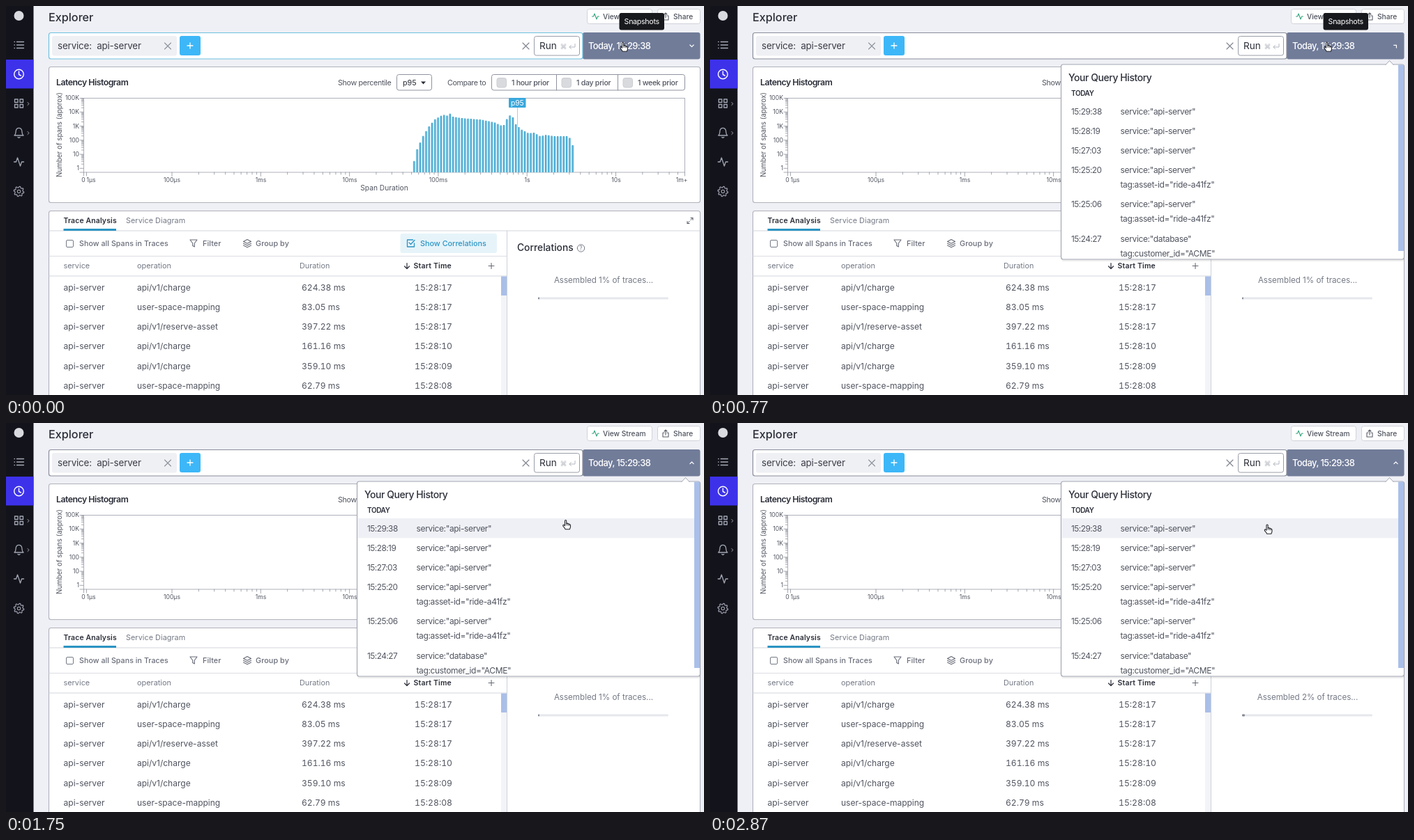
An HTML page that plays this animation: 1001x559 px, repeating every 3.01 s.

```html
<!DOCTYPE html>
<html lang="en">
<head>
<meta charset="utf-8">
<title>Explorer</title>
<style>
html, body { margin: 0; width: 100%; height: 100%; overflow: hidden; background: #eff0f5; }
svg { display: block; width: 100vw; height: 100vh; }
text { font-family: Inter, "Open Sans", "DejaVu Sans", sans-serif; white-space: pre; }
.tabular { font-variant-numeric: tabular-nums; }
</style>
</head>
<body>
<svg id="stage" viewBox="0 0 1001 559"></svg>
<script>
const LOOP = 3010, STEP = 70;
const INK = '#2b2e38', TEXT = '#50545f', MUTED = '#747985', LINE = '#b0b2bb', BLUE = '#2b94c4';

// Text placed by the middle of its capitals.
function label(x, y, str, size, { fill = TEXT, weight = 400, gap = 0, anchor = 'start', extra = '' } = {}) {
  return `<text x="${x}" y="${(y + size * 0.36).toFixed(2)}" font-size="${size}" fill="${fill}" font-weight="${weight}"
    letter-spacing="${gap}" text-anchor="${anchor}" ${extra}>${str}</text>`;
}
function box(x, y, w, h, fill, stroke = 'none', r = 0, extra = '') {
  return `<rect x="${x}" y="${y}" width="${w}" height="${h}" rx="${r}" fill="${fill}" stroke="${stroke}" ${extra}/>`;
}
function path(d, stroke, width = 1, extra = '') {
  return `<path d="${d}" fill="none" stroke="${stroke}" stroke-width="${width}" stroke-linecap="round" stroke-linejoin="round" ${extra}/>`;
}
function icon(x, y, d, stroke, width = 1.3) {
  return path(d, stroke, width, `transform="translate(${x} ${y})"`);
}
const ring = r => `M${-r} 0A${r} ${r} 0 1 1 ${r} 0A${r} ${r} 0 1 1 ${-r} 0`;
const cross = 'M-4.5 -4.5L4.5 4.5M4.5 -4.5L-4.5 4.5';
const plus = 'M-4 0H4M0 -4V4';
const pulse = 'M-7 0H-4L-2 -6L2 6L4 0H7';

function gear(teeth, inner, outer) {
  const points = Array.from({ length: teeth * 4 }, (_, i) => {
    const a = (i + 0.5) * Math.PI / (teeth * 2), r = i % 4 < 2 ? outer : inner;
    return `${(r * Math.cos(a)).toFixed(2)} ${(r * Math.sin(a)).toFixed(2)}`;
  });
  return `M${points.join('L')}Z`;
}

// Linear interpolation through points [position, ...values].
function through(points, p, column = 1) {
  let i = 1;
  while (i < points.length - 1 && points[i][0] < p) i++;
  const a = points[i - 1], b = points[i];
  const u = Math.min(1, Math.max(0, (p - a[0]) / (b[0] - a[0])));
  return a[column] + (b[column] - a[column]) * u;
}

function sidebar() {
  const c = '#a4a7b5';
  return box(0, 0, 39.5, 559, '#13141b') + box(0, 77, 39.5, 41.5, '#3d32ea')
    + '<circle cx="18.5" cy="14" r="7" fill="#d9dae0"/>'
    + icon(18.5, 56, 'M-6.5 -4.5H-6M-3 -4.5H7M-6.5 0H-6M-3 0H7M-6.5 4.5H-6M-3 4.5H7', c)
    + icon(18.5, 98, ring(6.8) + 'M0 -4V0.5L3 2', '#fff', 1.4)
    + icon(18.5, 140, 'M-6 -6H-1.5V-1.5H-6ZM1.5 -6H6V-1.5H1.5ZM-6 1.5H-1.5V6H-6ZM1.5 1.5H6V6H1.5Z', c)
    + icon(18.5, 182, 'M-6.5 4C-4 2 -4.5 -1 -4.3 -2.5C-3.6 -8 3.6 -8 4.3 -2.5C4.5 -1 4 2 6.5 4ZM-1.5 6.5Q0 8 1.5 6.5', c)
    + icon(18.5, 224, pulse, c)
    + icon(18.5, 266.5, ring(2.2) + gear(8, 5.6, 7.3), c, 1.1)
    + icon(32, 140.5, 'M-1 -2L1 0L-1 2', c, 1) + icon(32, 182.5, 'M-1 -2L1 0L-1 2', c, 1);
}

function topBar() {
  const button = { fill: '#4d515c', weight: 500 };
  return label(61, 16, 'Explorer', 16.2, { fill: INK, weight: 500 })
    + box(833.5, 4.5, 93, 21, '#fff', '#cfd2da', 3) + box(934.5, 4.5, 61, 21, '#fff', '#cfd2da', 3)
    + icon(845.5, 15, 'M-5 0H-3L-1.5 -4L1.5 4L3 0H5', '#39a582', 1.1)
    + label(856, 15, 'View Stream', 10.2, button)
    + icon(946, 15, 'M-2 -1H-4V5H4V-1H2M0 2V-5M-2 -3L0 -5L2 -3', '#5a5e69', 1.1)
    + label(957, 15, 'Share', 10.2, button)
    + box(827, 38, 168.5, 38.5, '#717c99', 'none', 3)
    + box(61.5, 38.5, 765.5, 37.5, '#fff', '#8a8e9b', 3, 'id="search" stroke-width="1.2"')
    + box(66, 43, 179, 28.5, '#eff0f4', 'none', 3)
    + label(74, 57.5, 'service:  api-server', 13.4, { fill: '#3a3d47', gap: -0.16 })
    + icon(232, 57.5, cross, '#8d919c', 1.1)
    + box(249, 43, 30, 28, '#3db7f8', 'none', 3) + icon(264, 57, plus, '#fff', 1.3)
    + icon(745.5, 57.5, cross, '#7d818c', 1.1)
    + box(757.5, 43.5, 65, 27.5, '#fff', '#999da8', 3)
    + label(765, 57.5, 'Run', 13.6, { fill: INK })
    + label(794.5, 58.5, '⌘', 10, { fill: '#b4b7c0' })
    + icon(812, 58, 'M4 -3.5V1H-4M-1.5 -1.5L-4 1L-1.5 3.5', '#b4b7c0', 1)
    + label(835, 57.5, 'Today, 15:29:38', 12.9, { fill: '#fff', weight: 500, gap: -0.55 })
    + '<g id="chevron">' + path('M-2.6 -1.3L0 1.3L2.6 -1.3', '#fff', 1.2) + '</g>';
}

function histogram() {
  const small = { fill: TEXT, gap: -0.28, weight: 500 };
  let s = box(61.5, 87.5, 934, 195, '#fff', LINE, 3, 'stroke-width="1.1"')
    + label(72, 110, 'Latency Histogram', 12.3, { fill: INK, weight: 600, gap: -0.5 })
    + label(476, 110, 'Show percentile', 10.7, { gap: -0.32 })
    + box(560.5, 98.5, 50, 22.5, '#fff', '#8f939f', 3)
    + label(569, 110, 'p95', 10.8, { fill: INK })
    + '<path d="M595 108.5h7l-3.500 4z" fill="#2b2e38"/>'
    + label(633, 110, 'Compare to', 10.7, { gap: -0.38 })
    + box(696.5, 98.5, 277, 22.5, '#fff', '#8f939f', 3)
    + path('M789.500 98.500V121M877.500 98.500V121', '#8f939f');
  [[704, '1 hour prior'], [797, '1 day prior'], [885, '1 week prior']].forEach(([x, name]) => {
    s += box(x, 103.5, 13.5, 13.5, '#d9dade', '#cccdd2', 3) + label(x + 21, 110, name, 10.6, small);
  });

  s += box(111.5, 132.5, 862, 106.5, '#fff', '#aeb1ba');
  let ticks = 'M111.500 239V244M973.500 239V244M115.500 239V244';
  for (let d = 0; d < 6; d++) {
    for (let m = 1; m < 10; m++) {
      const x = 238 + 127.3 * (d + Math.log10(m));
      if (x < 973) ticks += `M${x.toFixed(1)} 239V${m === 1 ? 244.5 : 242}`;
    }
  }
  for (let d = 0; d < 5; d++) {
    for (let m = 1; m < 10; m++) {
      ticks += `M111 ${(233.3 - 20.25 * (d + Math.log10(m))).toFixed(1)}H${m === 1 ? 106 : 108.5}`;
    }
  }
  s += path(ticks + 'M111 132.500H106M111 239H106', '#8f939d', 0.8);
  ['1', '10', '100', '1K', '10K', '100K'].forEach((name, i) => {
    s += label(105, 233.3 - 20.25 * i, name, 8.6, { anchor: 'end' });
  });
  [[111, '0'], [122, '1µs'], [238, '100µs'], [365.5, '1ms'], [493, '10ms'], [620, '100ms'], [747.5, '1s'], [875, '10s'], [969, '1m+']]
    .forEach(([x, name]) => { s += label(x, 250, name, 8.6, { anchor: 'middle' }); });
  s += label(542.5, 261.5, 'Span Duration', 10.2, { anchor: 'middle' })
    + label(0, 0, 'Number of spans (approx)', 9.8, { anchor: 'middle', extra: 'transform="translate(76 185) rotate(-90)"' });

  const tops = [[585, 224], [589, 207], [598, 187], [606, 174], [615, 163], [627, 156], [632, 158], [636, 154], [641, 159],
    [652, 161], [680, 163], [700, 167], [713, 173], [718, 163], [722, 157], [727, 160], [731, 170], [740, 178], [750, 183],
    [757, 182], [766, 187], [775, 185], [785, 187], [804, 187], [809, 190], [813, 201]];
  let bars = '', shade = '';
  for (let i = 0; i < 54; i++) {
    const x = 585.3 + 4.29 * i, y = through(tops, x);
    bars += `M${(x - 1.1).toFixed(1)} 239V${y.toFixed(1)}h2.2V239z`;
    shade += `M${(x - 2.1).toFixed(1)} 239V${(y + 1).toFixed(1)}h4.29V239z`;
  }
  return s + path('M733.500 146V239', '#c3c6ce')
    + `<path d="${shade}" fill="#d8eef8"/><path d="${bars}" fill="#4aabd2"/>`
    + box(721, 132, 24.5, 14, '#3aa8dc', 'none', 1)
    + label(733.3, 139, 'p95', 10.3, { fill: '#fff', anchor: 'middle' });
}

function traces() {
  const tool = { fill: '#686c78', weight: 500, gap: 0.08 };
  const head = { fill: MUTED };
  let s = box(61.5, 294.5, 934, 280, '#fff', LINE, 3, 'stroke-width="1.1"')
    + path('M62 323H995', '#d3d5dc')
    + label(82.5, 308.5, 'Trace Analysis', 10.4, { fill: INK, weight: 600, gap: 0.16 })
    + label(172, 308.5, 'Service Diagram', 10.8, { fill: MUTED, gap: 0.06 })
    + box(82.5, 320, 75.5, 3, BLUE)
    + icon(981, 308.5, 'M1 -4H4V-1M4 -4L0.8 -0.8M-1 4H-4V1M-4 4L-0.8 0.8', '#555964', 1)
    + box(86.5, 336.5, 10, 10, '#fff', '#747985', 1.5)
    + label(105, 341, 'Show all Spans in Traces', 10.6, tool)
    + icon(269, 341, 'M-5 -5H5L1.3 0V5L-1.300 3.500V0Z', '#686c78', 1.1)
    + label(282, 341, 'Filter', 10.8, tool)
    + icon(346, 341, 'M0 -5.500L5.500 -2.500L0 0.300L-5.500 -2.500ZM-5.500 0.300L0 3L5.500 0.300M-5.500 3L0 5.700L5.500 3', '#686c78', 1.1)
    + label(358, 341, 'Group by', 10.8, tool)
    + box(565.5, 327, 138.5, 28, '#eef1f6', 'none', 3, 'id="toggle"')
    + icon(580.5, 341, 'M3 -5H-5V5H5V0M-2.500 -1L0 1.500L5.500 -4.500', BLUE, 1.3)
    + label(594, 341, 'Show Correlations', 10.8, { fill: BLUE, weight: 500 })
    + path('M62 359.500H718', '#dcdee4') + path('M62 388H718', '#d3d5dc') + path('M718.500 323V559', '#cfd1d9')
    + label(82.5, 373.5, 'service', 10.9, head) + label(188, 373.5, 'operation', 10.9, head)
    + label(421, 373.5, 'Duration', 10.8, head)
    + icon(575, 373.5, 'M0 -4V4M-3.500 0.500L0 4L3.500 0.500', INK, 1.2)
    + label(584.5, 373.5, 'Start Time', 10.5, { fill: INK, weight: 600, gap: 0.18 })
    + icon(696, 373.5, plus, '#686c78', 1.1)
    + box(710, 388.5, 8, 171, '#f3f4f7') + box(710, 388.5, 8, 27.5, '#a9bfe9');
  [['api/v1/charge', '624.38', '17'], ['user-space-mapping', '83.05', '17'], ['api/v1/reserve-asset', '397.22', '17'],
    ['api/v1/charge', '161.16', '10'], ['api/v1/charge', '359.10', '09'], ['user-space-mapping', '62.79', '08']]
    .forEach(([operation, ms, sec], i) => {
      const y = 404.8 + 28.1 * i, digits = { extra: 'class="tabular"' };
      s += label(82.5, y, 'api-server', 12.1) + label(188, y, operation, 12)
        + label(424, y, ms + ' ms', 12.1, digits) + label(586, y, '15:28:' + sec, 12.2, digits);
    });
  return s + label(733, 347, 'Correlations', 13.8, { fill: INK, weight: 500 })
    + icon(824.5, 348, ring(5.2), '#747985', 1)
    + label(824.5, 348, '?', 8.5, { fill: '#747985', anchor: 'middle' })
    + label(857, 394, '', 11.6, { fill: MUTED, anchor: 'middle', extra: 'id="progress"' })
    + box(763, 418.5, 187, 3, '#e6e7ec', 'none', 1.5)
    + box(763, 418.5, 2, 3, '#858994', 'none', 1, 'id="meter"');
}

function historyPanel() {
  const asset = 'tag:asset-id="ride-a41fz"';
  let s = box(504, 86, 491.5, 281, '#000', 'none', 3, 'opacity=".07"')
    + box(503.5, 84, 492, 280, '#fff', '#a3a7b3', 3, 'stroke-width="1.2"')
    + '<path d="M968.500 85L974.500 78.500L980.500 85" fill="#fff" stroke="#a3a7b3"/>'
    + box(987, 84.5, 8, 267.5, '#a9bfe9')
    + box(504.2, 137, 482.8, 28.3, '#eff0f5', 'none', 0, 'id="hover"')
    + label(514, 102.5, 'Your Query History', 13.9, { fill: INK, weight: 500, gap: -0.4 })
    + label(518, 125, 'TODAY', 10, { fill: INK, weight: 600, gap: -0.4 });
  [[152, '29:38'], [180, '28:19'], [208, '27:03'], [236, '25:20', asset], [285, '25:06', asset],
    [334.5, '24:27', 'tag:customer_id="ACME"', 'database']]
    .forEach(([y, time, tag, service = 'api-server']) => {
      s += label(518, y, '15:' + time, 11.8, { gap: -0.5 })
        + label(588.5, y, `service:"${service}"`, 12, { gap: -0.35 });
      if (tag) s += label(588.5, y + 21, tag, 12, { gap: -0.37 });
    });
  return `<g id="history">${s}</g>`;
}

function overlay() {
  const hand = 'M-2.500 0.500V-5.200Q-2.500 -6.500 -1.400 -6.500Q-0.300 -6.500 -0.300 -5.200V-1.600Q1.300 -2.400 1.800 -1.100'
    + 'Q3.300 -1.700 3.700 -0.400Q5.500 -0.600 5.500 1.200V3Q5.500 4.500 4.300 6.800H-1.800Q-2.400 5 -4.300 3.200'
    + 'Q-5.800 1.200 -4.800 0.500Q-3.800 0 -2.500 1.800Z';
  return '<g id="tip">' + box(879.5, 10, 64.5, 24.5, '#18191d', 'none', 3)
    + label(911.7, 22, 'Snapshots', 10.7, { fill: '#fff', gap: -0.33, anchor: 'middle' }) + '</g>'
    + `<g id="cursor"><path d="${hand}" fill="#fff" stroke="#22242b" stroke-width="1.1" stroke-linejoin="round"/>`
    + path('M-0.300 -1.500V1M1.800 -1V1.200M3.700 -0.300V1.500', '#22242b', 0.8) + '</g>';
}

const stage = document.getElementById('stage');
stage.innerHTML = sidebar() + topBar() + histogram() + traces() + historyPanel() + overlay();
const el = id => document.getElementById(id);
const set = (id, name, value) => el(id).setAttribute(name, value);
const show = (id, on) => set(id, 'visibility', on ? 'inherit' : 'hidden');

const cursorPath = [[1120, 886, 58.5], [1190, 875, 63], [1330, 842.5, 86], [1540, 815, 125], [1750, 804, 146], [1890, 800.5, 152.5]];

function render(time) {
  const t = Math.floor((time % LOOP) / STEP) * STEP;
  const x = through(cursorPath, t, 1), y = through(cursorPath, t, 2);
  const percent = t < 1960 ? 1 : 2;
  const turn = -180 * Math.min(1, Math.max(0, (t - 700) / 93.3));

  set('cursor', 'transform', `translate(${x} ${y})`);
  set('chevron', 'transform', `translate(983.5 57.3) rotate(${turn})`);
  set('search', 'stroke', t < 630 ? '#6fc2e0' : '#8a8e9b');
  set('toggle', 'fill', t < 350 ? '#e6f4fa' : '#eef1f6');
  set('meter', 'width', percent * 2);
  el('progress').textContent = `Assembled ${percent}% of traces...`;
  show('history', t >= 770);
  show('hover', y > 137);
  show('tip', t < 1400);
}

const start = performance.now();
function tick() {
  render(performance.now() - start);
  requestAnimationFrame(tick);
}
tick();
</script>
</body>
</html>
```
